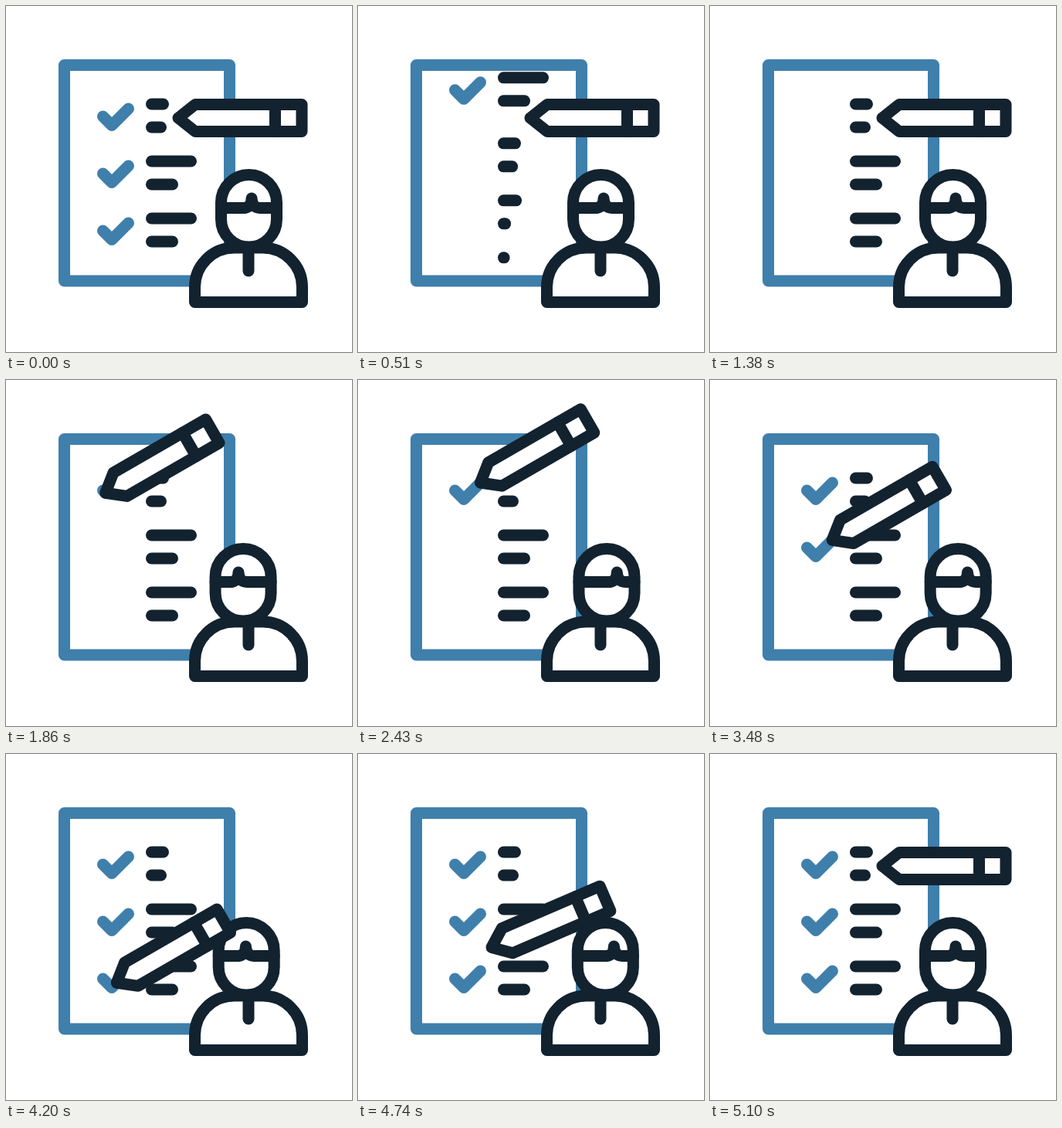
Recreate the animation shown at these times as an HTML page. Size 448 by 448 pixels, loop 5.43 s.

```html
<!DOCTYPE html>
<html lang="en">
<head>
<meta charset="utf-8">
<title>Checklist</title>
<style>
  html, body { margin: 0; width: 100%; height: 100%; overflow: hidden; background: #fff; }
  svg { display: block; width: 100%; height: 100%; }
  .ink, .blue { fill: none; stroke-width: 15; stroke-linecap: round; stroke-linejoin: round; }
  .ink { stroke: #12222f; }
  .blue { stroke: #3f7fab; }
  .solid { fill: #fff; }
</style>
</head>
<body>
<svg viewBox="0 0 448 448">
  <defs>
    <clipPath id="sheet"><rect x="83" y="83" width="260" height="268"/></clipPath>
  </defs>
  <rect class="blue solid" x="75.5" y="76.5" width="214" height="279.5"/>
  <g clip-path="url(#sheet)">
    <g id="old"></g>
    <g id="fresh"></g>
  </g>
  <path class="ink solid" d="M244.5 383.5V364A51 51 0 0 1 295.5 313H332.5A51 51 0 0 1 383.5 364V383.5Z"/>
  <path class="ink" d="M314 313V343"/>
  <g id="head">
    <path class="ink solid" d="M278.5 254.5A36 36 0 0 1 350.5 254.5V276A36 36 0 0 1 278.5 276Z"/>
    <path class="ink" id="hair"/>
  </g>
  <g id="pencil">
    <path class="ink solid" d="M0 0L22 -17.5H160V17.5H22Z"/>
    <path class="ink" d="M125.5 -17.5V17.5"/>
  </g>
</svg>
<script>
const LOOP = 5430;
const ROW_GAP = 74, SCROLL = 233, SCROLL_END = 740;
const CYCLE = 1080;               // time from one check to the next
const START = 1830, TURN = 1940, END = 2430;
const LEG1 = 16.6 / 47;           // share of the check before its corner

// Per row: line lengths and the times at which they begin to grow
const ROWS = [
  { len: [15, 12], at: [40, 140] },
  { len: [51, 27], at: [340, 430] },
  { len: [51, 27], at: [480, 560] }
];
const GROW = 450;

const $ = id => document.getElementById(id);
const clamp = p => Math.max(0, Math.min(1, p));
const span = (t, a, b) => clamp((t - a) / (b - a));
const ease = p => (1 - Math.cos(Math.PI * p)) / 2;
const mix = (a, b, p) => a + (b - a) * p;
const move = (a, b, p) => a.map((v, i) => mix(v, b[i], p));

function add(parent, tag, attrs) {
  const el = document.createElementNS("http://www.w3.org/2000/svg", tag);
  for (const k in attrs) el.setAttribute(k, attrs[k]);
  return parent.appendChild(el);
}

function buildRows(group) {
  return ROWS.map((row, i) => {
    const y = i * ROW_GAP;
    return {
      check: add(group, "path", {
        class: "blue", pathLength: 1, d: `M125.5 ${143 + y}L137 ${154.5 + y}L158.5 ${133 + y}`
      }),
      lines: row.len.map((len, k) => add(group, "line", {
        class: "ink", x1: 188.5, x2: 188.5 + len, y1: 127 + y + 30 * k, y2: 127 + y + 30 * k
      }))
    };
  });
}

buildRows($("old"));
const fresh = buildRows($("fresh"));

const REST = [223, 145];
const checkPoint = (i, k) => [[125.5, 143], [137, 154.5], [158.5, 133]][k].map((v, j) => v + j * i * ROW_GAP);

// Share of check i that is drawn at time t
function drawn(t, i) {
  const u = t - i * CYCLE;
  if (u < TURN) return LEG1 * span(u, START, TURN);
  return mix(LEG1, 1, 1 - (1 - span(u, TURN, END)) ** 1.5);
}

function alongCheck(i, p) {
  return p < LEG1
    ? move(checkPoint(i, 0), checkPoint(i, 1), p / LEG1)
    : move(checkPoint(i, 1), checkPoint(i, 2), (p - LEG1) / (1 - LEG1));
}

function tipAt(t) {
  if (t < START) return move(REST, checkPoint(0, 0), ease(span(t, 1440, START)));
  const i = Math.min(2, Math.floor((t - START) / CYCLE));
  const u = t - i * CYCLE;
  const end = checkPoint(i, 2);
  if (u < END) return alongCheck(i, drawn(t, i));
  if (i === 2) return move(end, REST, ease(span(t, 4590, 5070)));
  const p = ease(span(u, END, START + CYCLE));
  const via = [123, end[1] + 20];
  return move(move(end, via, p), move(via, checkPoint(i + 1, 0), p), p);
}

const tiltAt = t => -30 * ease(span(t, 1440, START)) * (1 - ease(span(t, 4590, 5070)));

function turnAt(t) {
  if (t < 1890) return -7.5 * ease(span(t, 1440, 1890));
  const i = Math.min(2, Math.floor((t - 1890) / CYCLE));
  const u = t - i * CYCLE;
  if (u < END) return mix(-7.5, 7.5, span(u, 1890, END));
  return i === 2
    ? 7.5 * (1 - ease(span(t, 4590, 5070)))
    : mix(7.5, -7.5, ease(span(u, END + 60, 1890 + CYCLE)));
}

function render(t) {
  const shift = SCROLL * ease(span(t, 0, SCROLL_END));
  $("old").setAttribute("transform", `translate(0 ${-shift})`);
  $("old").style.display = t < SCROLL_END ? "" : "none";
  $("fresh").setAttribute("transform", `translate(0 ${SCROLL - shift})`);

  fresh.forEach((row, i) => {
    row.lines.forEach((line, k) => {
      const p = span(t, ROWS[i].at[k], ROWS[i].at[k] + GROW);
      line.setAttribute("x2", 188.5 + ROWS[i].len[k] * ease(p) + 0.01);
      line.style.display = p > 0 ? "" : "none";
    });
    const p = drawn(t, i);
    row.check.style.display = p > 0 ? "" : "none";
    row.check.style.strokeDasharray = p < 1 ? `${p} 2` : "none";
  });

  const turn = turnAt(t), x = 318 + 1.3 * turn;
  $("head").setAttribute("transform", `translate(${turn} 0)`);
  $("hair").setAttribute("d",
    `M278.5 261.5H${x - 9}Q${x} 260 ${x} 249Q${x + 1} 261.5 ${x + 11} 261.5H350.5`);

  const [px, py] = tipAt(t);
  $("pencil").setAttribute("transform", `translate(${px} ${py}) rotate(${tiltAt(t)})`);
}

const begin = performance.now();
function tick() {
  render((performance.now() - begin) % LOOP);
  requestAnimationFrame(tick);
}
tick();
</script>
</body>
</html>
```
